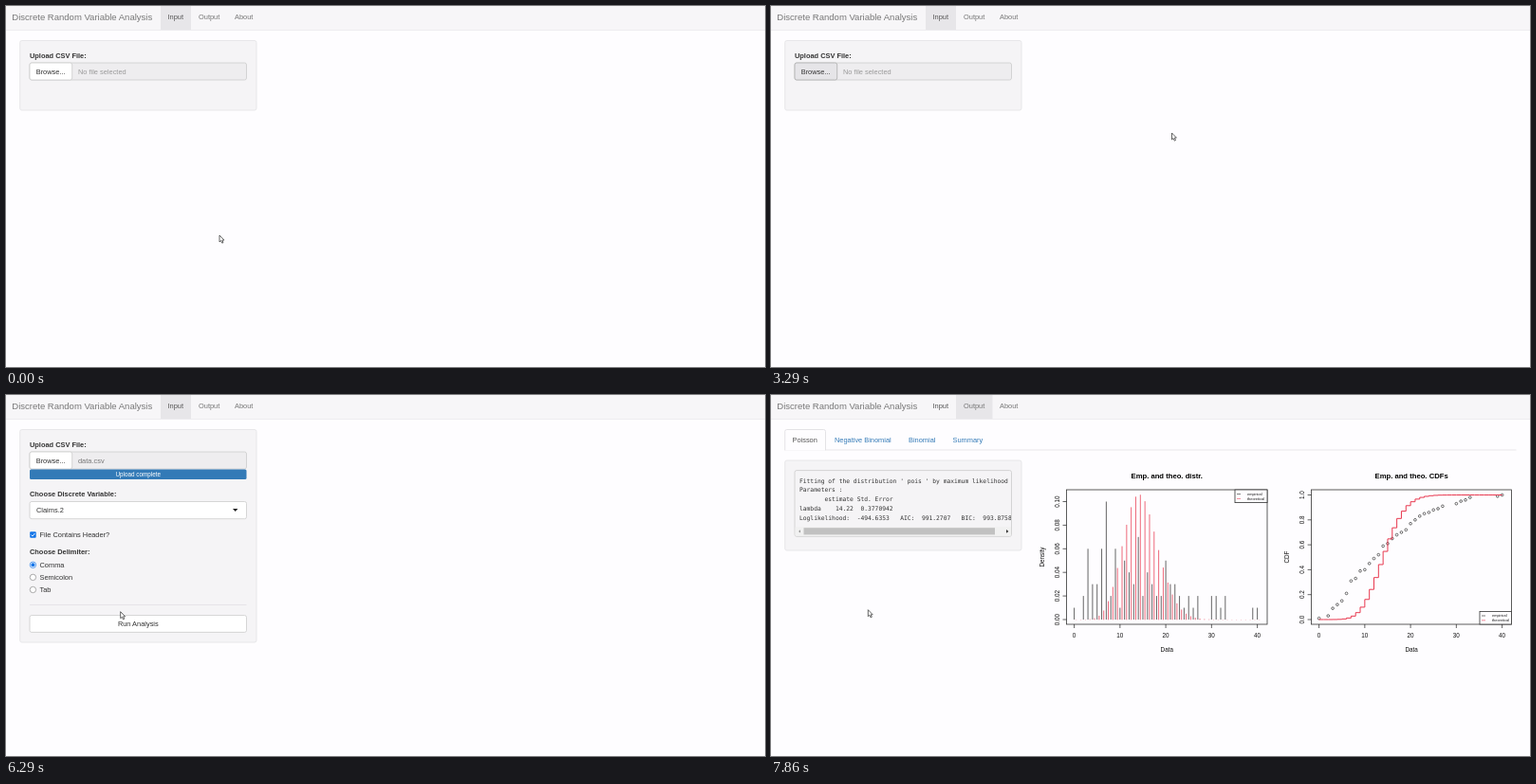
These frames come from a looping animation (800x381 px, 8000 ms). An HTML page:

```html
<!DOCTYPE html>
<html lang="en">
<head>
<meta charset="utf-8">
<title>Discrete Random Variable Analysis</title>
<style>
  html, body { margin: 0; width: 100%; height: 100%; overflow: hidden; background: #fefdff; }
  svg { display: block; width: 800px; height: 381px; }
  text { font-family: "Liberation Sans", Arial, sans-serif; white-space: pre; }
  .mono { font-family: "DejaVu Sans Mono", monospace; }
</style>
</head>
<body>
<svg id="stage" viewBox="0 0 800 381" xmlns="http://www.w3.org/2000/svg"></svg>
<script>
const LOOP = 8000, STEPS_PER_MS = 7 / 1000;
const LINK = '#337ab7', RED = '#e8384f', INK = '#333', MUTED = '#777';

const text = (x, y, str, o = {}) => {
  const { size = 7.42, fill = INK, bold, anchor = 'start', cls = '', turn } = o;
  return `<text x="${x}" y="${y}" font-size="${size}" fill="${fill}" text-anchor="${anchor}" class="${cls}"` +
    `${bold ? ' font-weight="700"' : ''}${turn ? ` transform="rotate(-90 ${x} ${y})"` : ''}>${str}</text>`;
};
const bold = (x, y, str) => text(x, y, str, { bold: true });
const rect = (x, y, x2, y2, fill, stroke = 'none', r = 0, extra = '') =>
  `<rect x="${x}" y="${y}" width="${x2 - x}" height="${y2 - y}" rx="${r}" fill="${fill}" stroke="${stroke}" stroke-width=".8" ${extra}/>`;
const path = (d, stroke = '#222', width = .7, fill = 'none') =>
  `<path d="${d}" stroke="${stroke}" stroke-width="${width}" fill="${fill}"/>`;
const solid = (d, fill) => path(d, 'none', 0, fill);
const range = (n, f) => Array.from({ length: n }, (_, i) => f(i));
const group = (id, body) => `<g id="${id}">${body}</g>`;
const well = (y, y2) => rect(14.7, y, 264, y2, '#f5f4f6', '#e3e2e5', 2);

function navbar() {
  return rect(0, 0, 800, 25, '#f7f6f8') + rect(0, 25, 800, 25.7, '#e7e6e9') +
    rect(163, 0, 195, 25, '#e7e6e9', 'none', 0, 'id="activeTab"') +
    text(6.3, 15.2, 'Discrete Random Variable Analysis', { size: 9.52, fill: MUTED }) +
    text(170.5, 14.2, 'Input', { fill: '#555' }) +
    text(203, 14.2, 'Output', { fill: MUTED }) +
    text(241, 14.2, 'About', { fill: MUTED });
}

function upload() {
  return bold(25, 54.5, 'Upload CSV File:') +
    rect(25, 60, 253.5, 78, '#eeedef', '#ccc', 2) +
    rect(25, 60, 69.7, 78, '#fff', '#ccc', 2, 'id="browse"') +
    text(31.7, 71.6, 'Browse...') +
    text(76, 71.6, '', { fill: '#999' }).replace('<text', '<text id="fileName"');
}

function options() {
  const radio = (y, label, on) =>
    `<circle cx="28.4" cy="${y}" r="3.2" fill="#fff" stroke="${on ? '#1475e8' : '#888'}" stroke-width=".7"/>` +
    (on ? `<circle cx="28.4" cy="${y}" r="2" fill="#1475e8"/>` : '') + text(35.5, y + 2.2, label);
  return bold(25, 107.2, 'Choose Discrete Variable:') +
    rect(25, 112.5, 253.5, 130.7, '#fff', '#ccc', 2, 'id="select"') +
    text(32, 124.1, 'ID').replace('<text', '<text id="choice"') +
    path('M39.2 117.8V125.6', '#222', .7).replace('<path', '<path id="caret"') +
    solid('M239 120L244.4 120L241.7 123Z', '#222').replace('<path', '<path id="arrow"') +
    rect(25.2, 144.3, 31.7, 150.8, '#1475e8', 'none', 1) +
    path('M26.6 147.6L28 149L30.4 146', '#fff', .9) +
    text(35.5, 149.6, 'File Contains Header?') +
    bold(25, 167.8, 'Choose Delimiter:') +
    radio(179.3, 'Comma', true) + radio(192.4, 'Semicolon') + radio(205.5, 'Tab') +
    path('M25 221.5H253.5', '#e0dfe2', .7) +
    rect(25, 232.6, 253.5, 250.4, '#fff', '#ccc', 2, 'id="run"') +
    text(139.3, 243.9, 'Run Analysis', { anchor: 'middle' });
}

function dropdown() {
  const items = ['ID', 'Claims.1', 'Claims.2', 'Claims.3', 'Loss.1', 'Loss.2', 'Loss.3', 'Loss.4'];
  return '<clipPath id="listClip"><rect x="25" y="132" width="229" height="107"/></clipPath>' +
    rect(25, 132, 253.5, 239, '#fff', '#c8c8c8', 1, 'style="filter:drop-shadow(0 2px 2px #0003)"') +
    rect(25.5, 135.2, 245, 149, '#f5f4f6', 'none', 0, 'id="hover"') +
    `<g clip-path="url(#listClip)">${items.map((s, i) => text(32, 144.4 + i * 13.8, s)).join('')}</g>` +
    rect(245, 132.6, 252.8, 238.6, '#f1f1f1') + rect(245.6, 141.4, 252.2, 188.3, '#bfbfbf') +
    solid('M247.2 138.4L250.6 138.4L248.9 136.4Z', '#999') +
    solid('M247 233L250.8 233L248.9 235.4Z', '#333');
}

const counts = { 0: 1, 2: 2, 3: 6, 4: 3, 5: 3, 6: 6, 7: 10, 8: 2, 9: 6, 10: 1, 11: 5, 12: 4, 13: 3, 14: 7,
  15: 2, 16: 4, 17: 3, 18: 2, 19: 2, 20: 5, 21: 3, 22: 3, 23: 2, 24: 1, 25: 2, 26: 1, 27: 2,
  30: 2, 31: 2, 32: 1, 33: 2, 39: 1, 40: 1 };
const lambda = 14.22;
const poisson = range(41, k => {
  let p = Math.exp(-lambda);
  for (let i = 1; i <= k; i++) p *= lambda / i;
  return p;
});

function axes(left, right, x0, title, yLabel, ticks, yOf) {
  const small = { size: 6.3, anchor: 'middle', fill: '#111' }, mid = (left + right) / 2;
  return rect(left, 100, right, 242, 'none', '#333') +
    text(mid, 87.6, title, { size: 7.68, bold: true, anchor: 'middle', fill: '#000' }) +
    text(mid, 271.4, 'Data', small) + text(left - 24, 171, yLabel, { ...small, turn: true }) +
    range(5, i => path(`M${x0 + i * 48.25} 242v4`) + text(x0 + i * 48.25, 256.2, i * 10, small)).join('') +
    ticks.map(v => path(`M${left} ${yOf(v)}h-4`) + text(left - 7.5, yOf(v), v, { ...small, turn: true })).join('');
}

function legend(left, top, right, bottom) {
  const row = (y, name, color) => path(`M${left + 2} ${y}h4`, color, .6) +
    text(left + 13, y + 1.3, name, { size: 3.9, fill: '#111' });
  return rect(left, top, right, bottom, '#fefdff', '#333') +
    row(top + 4.6, 'empirical', '#222') + row(top + 9.4, 'theoretical', RED);
}

function densityPlot() {
  const x = k => 319.6 + k * 4.825, y = d => 237 - d * 1245;
  const bars = Object.entries(counts).map(([k, n]) => `M${x(+k)} 237V${y(n / 100)}`).join('');
  const fitted = poisson.map((p, k) => `M${x(k + .45)} 237.3V${y(p)}`).join('');
  return axes(311.5, 523, 319.6, 'Emp. and theo. distr.', 'Density',
      range(6, i => (i * .02).toFixed(2)), y) +
    path(bars, '#333', .75) + path(fitted, RED, .75) + legend(489, 100, 523, 113.6);
}

function cdfPlot() {
  const x = k => 577.6 + k * 4.825, y = p => 237 - p * 131.5;
  let sum = 0, total = 0;
  const steps = poisson.map((p, k) => (k ? 'H' + x(k) + 'V' : `M${x(0)} `) + y(sum += p)).join('');
  const dots = Object.entries(counts).map(([k, n]) =>
    `<circle cx="${x(+k)}" cy="${y((total += n) / 100)}" r="1.35" fill="none" stroke="#222" stroke-width=".65"/>`).join('');
  return axes(569.6, 780.6, 577.6, 'Emp. and theo. CDFs', 'CDF',
      range(6, i => (i * .2).toFixed(1)), y) +
    dots + path(steps, RED, 1) + legend(747, 228.4, 780.6, 242);
}

function results() {
  const lines = [
    "Fitting of the distribution ' pois ' by maximum likelihood ",
    'Parameters : ',
    '       estimate Std. Error',
    'lambda    14.22  0.3770942',
    'Loglikelihood:  -494.6353   AIC:  991.2707   BIC:  993.8758'];
  return path('M0 0').replace('M0 0', 'M14.7 58H785.5', ) .replace('#222', '#dddce0') +
    path('M14.7 58.4V38.5a2 2 0 0 1 2-2H55.5a2 2 0 0 1 2 2V58.4', '#dddce0', .8, '#fefdff') +
    text(22.5, 49.7, 'Poisson', { fill: '#555' }) +
    [[67, 'Negative Binomial'], [145, 'Binomial'], [191.5, 'Summary']]
      .map(([x, s]) => text(x, 49.7, s, { fill: LINK })).join('') +
    well(69, 164) + rect(25, 79.6, 253.5, 149.3, '#f5f4f6', '#ccc', 2) +
    '<clipPath id="logClip"><rect x="25" y="80" width="228" height="60"/></clipPath>' +
    `<g clip-path="url(#logClip)">${lines.map((s, i) =>
      text(30, 92.5 + i * 9.75, s, { size: 6.3, cls: 'mono' })).join('')}</g>` +
    rect(25.6, 139.4, 253, 148.6, '#f1f1f1') + rect(34.5, 140.2, 236, 147.4, '#c1c1c1') +
    solid('M31 142.2V145.6L29 143.9Z', '#999') + solid('M248 142V145.8L250.4 143.9Z', '#333') +
    densityPlot() + cdfPlot();
}

const pointers = group('pointer-arrow',
    path('M0 0V7L1.6 5.6L2.8 8.2L4 7.6L2.9 5.1H4.9Z', '#333', .75, '#fff')) +
  group('pointer-hand',
    path('M-.6 .6Q0 -.4 .7 .6V4.2L3.6 4.9Q4.6 5.2 4.4 6.4L3.7 10H-.3L-2.4 6.6Q-2.2 5.3 -.6 6.6Z', '#222', .75, '#fff') +
    path('M1.5 4.6V6M2.8 5V6.2', '#222', .4)) +
  group('pointer-beam', path('M-1.5 -3.5H1.5M0 -3.5V3.5M-1.5 3.5H1.5', '#333', .7));

document.getElementById('stage').innerHTML =
  rect(0, 0, 800, 381, '#fefdff') + navbar() +
  group('inputPage',
    well(36.5, 110).replace('<rect', '<rect id="panel"') + upload() +
    group('progress', rect(25, 78.4, 253.5, 89, LINK, 'none', 1.5) +
      text(139.3, 86.1, 'Upload complete', { size: 6.35, fill: '#fff', anchor: 'middle' })) +
    group('options', options()) + group('list', dropdown())) +
  group('outputPage', results()) + group('pointer', pointers);

const $ = id => document.getElementById(id);
const show = (id, on) => { $(id).style.display = on ? '' : 'none'; };
const set = (id, attrs) => { for (const k in attrs) $(id).setAttribute(k, attrs[k]); };

// step, pointer shape, x, y
const route = [
  [0, 'arrow', 225, 242], [1, 'arrow', 221, 224], [3, 'arrow', 120, 90], [4, 'hand', 41, 14],
  [8, 'hand', 207, 14], [9, 'hand', 55.5, 72.5], [16, 'arrow', 54.5, 72.5], [17, 'arrow', 54.5, 72.5],
  [18, 'arrow', 110, 85], [20, 'arrow', 380, 142], [21, 'arrow', 428, 154], [22, 'arrow', 427, 146],
  [23, 'arrow', 422.5, 134], [25, 'arrow', 422.5, 134], [28, 'arrow', 330, 124], [32, 'beam', 105, 123],
  [33, 'beam', 97.7, 127], [36, 'beam', 97.7, 127], [37, 'hand', 80, 140], [39, 'hand', 55, 166],
  [40, 'hand', 55, 167], [41, 'arrow', 58, 172], [44, 'arrow', 120.7, 228.7], [46, 'arrow', 45, 162],
  [47, 'hand', 27, 145], [48, 'hand', 29, 176], [49, 'arrow', 34, 212], [50, 'hand', 60, 235],
  [51, 'hand', 97.5, 239], [54, 'hand', 97.5, 239], [55, 'arrow', 102.3, 226.7]];

function pointerAt(step) {
  const i = route.findLastIndex(p => p[0] <= step);
  const a = route[i], b = route[i + 1] || a;
  const u = b === a ? 0 : (step - a[0]) / (b[0] - a[0]);
  return { shape: a[1], x: a[2] + (b[2] - a[2]) * u, y: a[3] + (b[3] - a[3]) * u };
}

function render(ms) {
  const step = Math.floor(((ms % LOOP) + 3) * STEPS_PER_MS) % 56;
  const within = (from, to) => step >= from && step < to;
  const output = step >= 55, loaded = step >= 26, expanded = step >= 28, open = within(35, 41);

  show('inputPage', !output);
  show('outputPage', output);
  set('activeTab', output ? { x: 195, width: 38.5 } : { x: 163, width: 32 });

  set('browse', within(9, 26) ? { fill: '#e6e5e8', stroke: '#adadad' } : { fill: '#fff', stroke: '#ccc' });
  $('fileName').textContent = loaded ? 'data.csv' : 'No file selected';
  set('fileName', { fill: loaded ? '#777' : '#999' });
  show('progress', loaded);
  show('options', expanded);
  set('panel', { height: (expanded ? 261 : 110) - 36.5 });

  const focus = within(34, 41);
  set('select', { stroke: focus ? '#66afe9' : '#ccc' });
  $('select').style.filter = focus ? 'drop-shadow(0 0 1.5px #66afe9)' : '';
  set('arrow', { d: open ? 'M239 122.8L244.4 122.8L241.7 119.8Z' : 'M239 120L244.4 120L241.7 123Z' });
  $('choice').textContent = step >= 41 ? 'Claims.2' : 'ID';
  show('caret', open);
  show('list', open);
  set('hover', { y: 135.2 + 13.8 * (step >= 39 ? 2 : step === 38 ? 1 : 0) });

  const pressed = within(52, 55);
  set('run', pressed ? { fill: '#d4d3d6', stroke: '#222', 'stroke-width': 1.5 }
    : { fill: step >= 50 ? '#e6e5e8' : '#fff', stroke: step >= 50 ? '#adadad' : '#ccc', 'stroke-width': .8 });

  const p = pointerAt(step);
  for (const s of ['arrow', 'hand', 'beam']) show('pointer-' + s, s === p.shape);
  set('pointer', { transform: `translate(${p.x} ${p.y})` });
}

const start = performance.now();
function tick() {
  render(performance.now() - start);
  requestAnimationFrame(tick);
}
render(0);
requestAnimationFrame(tick);
</script>
</body>
</html>
```
